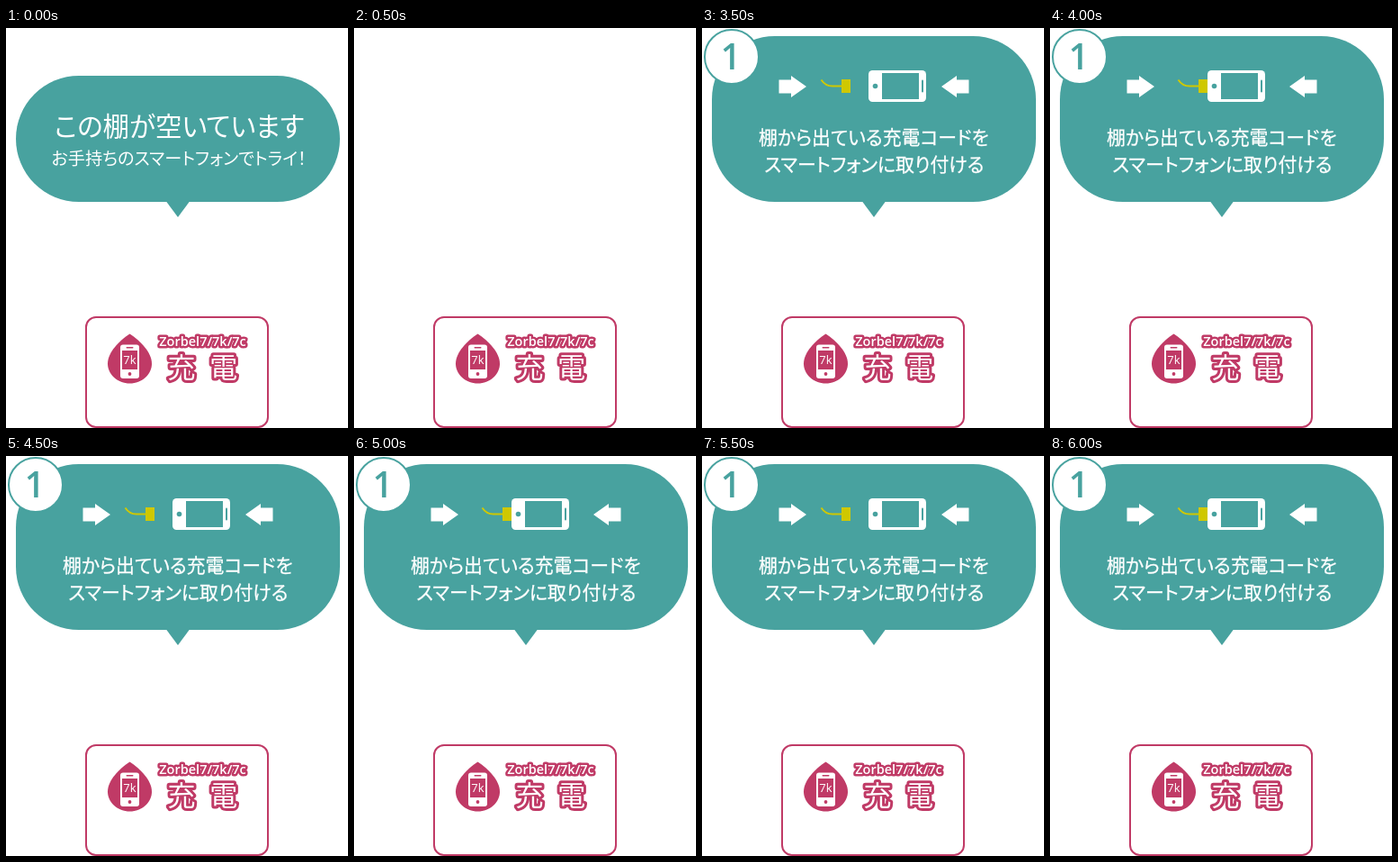
These frames come from a looping animation (380 by 444 pixels, 8 s). An HTML page:

```html
<!DOCTYPE html>
<html lang="ja">
<head>
<meta charset="utf-8">
<title>充電のご案内</title>
<style>
  :root { --teal: #48a29f; --rose: #c03a66; --cord: #cfc800; }
  html, body { margin: 0; width: 100%; height: 100%; overflow: hidden; background: #fff; }
  svg { display: block; width: 380px; height: 444px; }
  text { font-family: "Noto Sans CJK JP", "Noto Sans CJK", sans-serif; text-anchor: middle; fill: #fff; }
  .latin { font-family: "Open Sans", "Noto Sans", sans-serif; }
  .copy { font-feature-settings: "palt"; }
  .step .copy { stroke: #fff; stroke-width: .3px; }
  .teal { fill: var(--teal); }
  .rose { fill: var(--rose); }
  .white { fill: #fff; }
  .yellow { fill: var(--cord); }
  .wire { fill: none; stroke: var(--cord); stroke-width: 2px; }
  .badge { fill: #fff; stroke: var(--teal); stroke-width: 2px; }
  .frame { fill: #fff; stroke: var(--rose); stroke-width: 2px; }
  .outlined { stroke: var(--rose); stroke-width: 6px; stroke-linejoin: round; paint-order: stroke; }

  .intro, .step, .cord, .phone { animation: 8s step-end infinite; }
  .intro { animation-name: intro; }
  .step { animation-name: step; }
  .cord { --shift: 10px; animation-name: plug; }
  .phone { --shift: -10px; animation-name: plug; }

  @keyframes intro {
    0% { opacity: 1; }
    6.25%, 100% { opacity: 0; }
  }
  @keyframes step {
    0% { opacity: 0; }
    43.75%, 100% { opacity: 1; }
  }
  @keyframes plug {
    0%, 56.25%, 68.75% { transform: none; }
    50%, 62.5%, 75%, 100% { transform: translateX(var(--shift)); }
  }
</style>
</head>
<body>
<svg viewBox="0 0 380 444">
  <defs>
    <path id="tail" d="M178 192.5H204L191 210Z"/>
    <path id="arrow" d="M85.5 57.5H99V53L116 65L99 77V72.5H85.5Z"/>
  </defs>

  <g class="intro">
    <rect class="teal" x="11" y="53" width="360" height="140" rx="70"/>
    <use class="teal" href="#tail"/>
    <text class="copy" x="192.5" y="120" font-size="29.5">この棚が空いています</text>
    <text class="copy" x="192" y="152.3" font-size="19.2">お手持ちのスマートフォンでトライ！</text>
  </g>

  <g class="step">
    <rect class="teal" x="11" y="9" width="360" height="184" rx="70"/>
    <use class="teal" href="#tail"/>
    <circle class="badge" cx="33" cy="32" r="30"/>
    <text class="latin" x="32" y="46" font-size="39" font-weight="600" style="fill: var(--teal)">1</text>

    <use class="white" href="#arrow"/>
    <use class="white" href="#arrow" transform="matrix(-1 0 0 1 382 0)"/>
    <g class="cord">
      <path class="wire" d="M132.5 57.5Q137 64.5 145 64.5H156"/>
      <rect class="yellow" x="155" y="57" width="10" height="15"/>
    </g>
    <g class="phone">
      <rect class="white" x="185" y="47" width="64" height="35" rx="4.5"/>
      <rect class="teal" x="200" y="50" width="41" height="29"/>
      <circle class="teal" cx="192.5" cy="64.5" r="2.8"/>
      <rect class="teal" x="244" y="57.5" width="2" height="14" rx="1"/>
    </g>

    <text class="copy" x="190.8" y="128.8" font-size="20.9">棚から出ている充電コードを</text>
    <text class="copy" x="191.3" y="158.8" font-size="20.9">スマートフォンに取り付ける</text>
  </g>

  <g class="card">
    <rect class="frame" x="89" y="321" width="202" height="122" rx="11"/>
    <path class="rose" d="M137.5 339.5C149 347 162 360 162 372.5C162 384.6 151 394.5 137.5 394.5S113 384.6 113 372.5C113 360 126 347 137.5 339.5Z"/>
    <rect class="white" x="127" y="351.5" width="21" height="37.5" rx="3"/>
    <rect class="rose" x="129" y="358" width="17" height="21"/>
    <rect class="rose" x="133.5" y="354" width="8" height="1.5" rx=".7"/>
    <circle class="rose" cx="137.5" cy="384" r="1.9"/>
    <text class="latin" x="137.5" y="373" font-size="13">7k</text>
    <text class="latin outlined" x="218.5" y="352.5" font-size="14.5" font-weight="600" style="stroke-width: 5px">Zorbel7/7k/7c</text>
    <g class="outlined" font-size="31" font-weight="500">
      <text x="195" y="388.3">充</text>
      <text x="241.8" y="388.3">電</text>
    </g>
  </g>
</svg>
</body>
</html>
```
